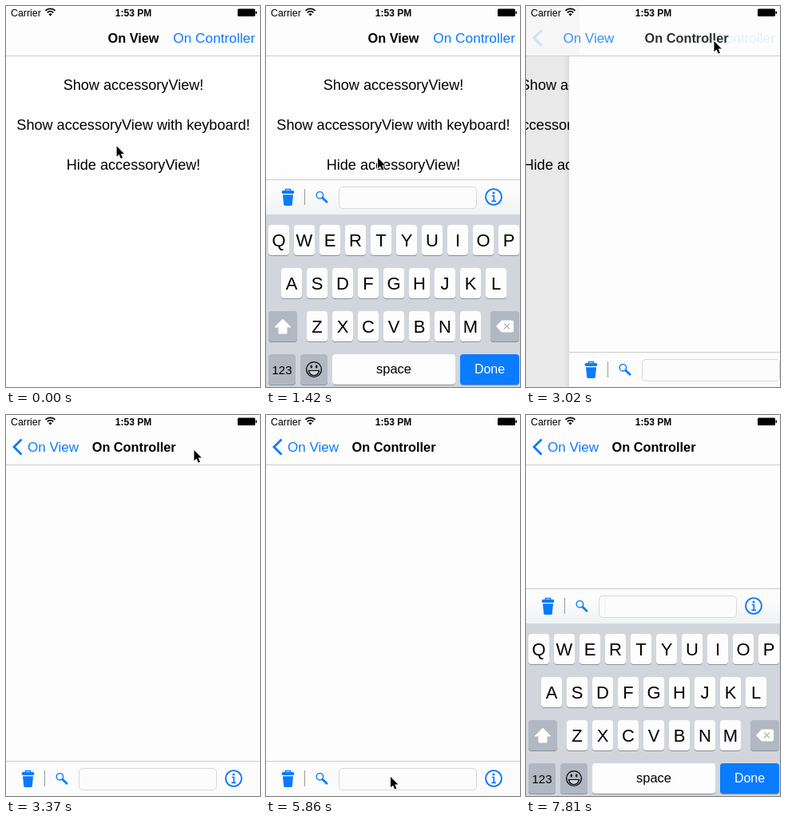
An HTML page that plays this animation: 318x477 px, repeating every 7.99 s.

```html
<!DOCTYPE html>
<html lang="en">
<head>
<meta charset="utf-8">
<title>Accessory view demo</title>
<style>
  html, body { margin: 0; width: 100%; height: 100%; overflow: hidden; background: #fefefe; }
  svg { display: block; width: 318px; height: 477px; }
  text { font-family: "Liberation Sans", Arial, sans-serif; font-size: 18.1px; fill: #000; }
  .mid { text-anchor: middle; }
  .bold { font-weight: bold; }
  .nav { font-size: 17px; }
  .blue { fill: #0a7aff; }
</style>
</head>
<body>
<svg id="stage" viewBox="0 0 318 477" xmlns="http://www.w3.org/2000/svg"></svg>
<script>
const LOOP = 7990, W = 318, H = 477, BAR = 44, KEYS = 216;
const BLUE = '#0a7aff';

const rect = (x, y, w, h, fill, more = '') =>
  `<rect x="${x}" y="${y}" width="${w}" height="${h}" fill="${fill}" ${more}/>`;
const path = (d, more) => `<path d="${d}" ${more}/>`;
const text = (x, y, s, more = '') => `<text x="${x}" y="${y}" ${more}>${s}</text>`;
const group = (id, body) => `<g id="${id}">${body}</g>`;

const key = (x, y, w, fill = '#fdfdfe') =>
  rect(x, y + 1, w, 38, '#8b9097', 'rx="4"') + rect(x, y, w, 38, fill, 'rx="4"');

function keyRow(letters, left, y) {
  return [...letters].map((c, i) => {
    const x = left + i * 32;
    return key(x, y, 26) + text(x + 13, y + 26.5, c, 'class="mid" style="font-size:22px"');
  }).join('');
}

function keyboard() {
  const grey = '#b1b8c2';
  const label = (x, y, s, size, fill = '#000') =>
    text(x, y, s, `class="mid" style="font-size:${size}px;fill:${fill}"`);
  return rect(0, 0, W, KEYS + 4, '#d2d6dc') +
    keyRow('QWERTYUIOP', 3, 13) + keyRow('ASDFGHJKL', 19, 67) + keyRow('ZXCVBNM', 51, 121) +
    key(3, 121, 36, grey) + key(281, 121, 36, grey) +
    path('M21 131L31 141H26V149H16V141H11Z', 'fill="#fff" stroke="#fff" stroke-linejoin="round"') +
    path('M288 140L295 132.5H307.5Q310 132.5 310 135V145Q310 147.5 307.5 147.5H295Z', 'fill="#fff"') +
    path('M298 136.5L305 143.5M305 136.5L298 143.5', `stroke="${grey}" stroke-width="1.4"`) +
    key(3, 175, 34, grey) + label(20, 200, '123', 15) +
    key(43, 175, 34, grey) +
    '<circle cx="60" cy="194" r="9.4" fill="none" stroke="#000" stroke-width="1.3"/>' +
    '<ellipse cx="56.8" cy="190.5" rx="1.2" ry="1.9"/><ellipse cx="63.2" cy="190.5" rx="1.2" ry="1.9"/>' +
    path('M53.5 195.5H66.5Q65 201.5 60 201.5Q55 201.5 53.5 195.5Z', 'fill="#d2d6dc" stroke="#000" stroke-width="1.2"') +
    key(83, 175, 154) + label(160, 199, 'space', 16.5) +
    key(243, 175, 74, '#0a7cff') + label(280, 199, 'Done', 16, '#fff');
}

function toolbar() {
  return rect(0, 0, W, BAR, '#fcfcfc') +
    rect(0, 0, W, BAR, 'url(#tint)', 'id="tint-bar"') +
    rect(0, 0, W, 1, '#cbcbcb') +
    path('M24.5 14V12.5H30.5V14', `fill="none" stroke="${BLUE}" stroke-width="1.6"`) +
    rect(19.8, 14, 15.4, 4, BLUE, 'rx="1.5"') +
    path('M21 19.3H34L32.8 31.5Q32.6 33 31 33H24Q22.4 33 22.2 31.5Z', `fill="${BLUE}"`) +
    rect(48, 12, 1, 20, '#999') +
    `<circle cx="67.4" cy="19.8" r="4.2" fill="none" stroke="${BLUE}" stroke-width="1.4"/>` +
    path('M70.8 23.2L76 28.2', `stroke="${BLUE}" stroke-width="2.8" stroke-linecap="round"`) +
    rect(91.5, 9.5, 172, 27, '#fcfcfc', 'rx="4.5" stroke="#d6d7d9"') +
    rect(98, 11, 2, 22, '#4a6bdc', 'id="caret"') +
    `<circle cx="285" cy="22" r="9.9" fill="none" stroke="${BLUE}" stroke-width="1.8"/>` +
    `<circle cx="285" cy="17" r="1.5" fill="${BLUE}"/>` +
    path('M282.8 20.5H285.3V27M282.3 27.3H288', `fill="none" stroke="${BLUE}" stroke-width="1.7"`);
}

function statusBar() {
  const arc = (r) => {
    const d = r * 0.72;
    return path(`M${55.5 - d} ${12 - d}A${r} ${r} 0 0 1 ${55.5 + d} ${12 - d}`,
      'fill="none" stroke="#000" stroke-width="1.8"');
  };
  return text(6, 13, 'Carrier', 'style="font-size:12.4px"') +
    arc(8.4) + arc(5.2) + path('M55.5 12.6L53.3 10.2Q55.5 8.4 57.7 10.2Z', '') +
    text(159.5, 13, '1:53 PM', 'class="mid bold" style="font-size:12px"') +
    rect(290, 3.5, 22, 9.5, '#000', 'rx="1.5"') + rect(312.5, 6.5, 1.6, 3.5, '#000', 'rx=".8"');
}

const stage = document.getElementById('stage');
stage.innerHTML = `<defs>
  <linearGradient id="tint" x2="0" y2="1">
    <stop offset=".3" stop-color="#fcfcfc"/><stop offset="1" stop-color="#f0f3f4"/>
  </linearGradient>
  <linearGradient id="edge"><stop stop-opacity="0"/><stop offset="1" stop-opacity=".06"/></linearGradient>
  </defs>` +
  rect(0, 0, W, H, '#fefefe') +
  group('first', text(159.5, 105, 'Show accessoryView!', 'class="mid"') +
    text(159.5, 155, 'Show accessoryView with keyboard!', 'class="mid"') +
    text(159.5, 205, 'Hide accessoryView!', 'class="mid"')) +
  rect(0, 62, W, 415, '#000', 'id="dim"') +
  group('second', rect(-7, 62, 7, 415, 'url(#edge)') + rect(0, 62, W, 415, '#fdfdfd')) +
  rect(0, 475, 138, 1, '#cbcbcb', 'id="stub"') +
  group('bar', toolbar()) + group('keys', keyboard()) +
  rect(0, 0, W, 62, '#fdfdfd') + rect(0, 0, W, 62, '#000', 'id="shade"') +
  rect(0, 62, W, 1, '#cbcbcb') + statusBar() +
  text(0, 46, 'On View', 'id="title1" class="mid bold" style="font-size:16.3px"') +
  text(312, 46, 'On Controller', 'id="button" class="blue" style="font-size:17.3px" text-anchor="end"') +
  text(0, 46, 'On View', 'id="back" class="nav blue"') +
  path('M19.5 30.5L10 40L19.5 49.5', `id="chevron" fill="none" stroke="${BLUE}" stroke-width="2.8"`) +
  text(0, 46, 'On Controller', 'id="title2" class="mid bold" style="font-size:16.3px"') +
  path('M0 0V13.2L3 10.4L5.2 15.6L7.4 14.7L5.2 9.6H9.3Z',
    'id="mouse" stroke="#fff" stroke-width="2" paint-order="stroke" stroke-linejoin="round"');

const el = {};
stage.querySelectorAll('[id]').forEach(n => el[n.id] = n);

const clamp = v => Math.max(0, Math.min(1, v));
const fade = (id, v) => el[id].setAttribute('opacity', clamp(v).toFixed(3));
const move = (id, x, y) => el[id].setAttribute('transform', `translate(${x.toFixed(2)} ${y.toFixed(2)})`);

// Critically damped spring: share of the way still to go
function left(t, start) {
  const x = Math.max(0, t - start) * 0.01826;
  return x > 12 ? 0 : (1 + x) * Math.exp(-x);
}

function blink(t, start) {
  const u = t - start + 40, v = u % 980;
  const rise = u < 980 ? 1 : clamp(v / 160);
  return Math.min(rise, clamp((710 - v) / 160));
}

// time, x, y of the pointer tip
const trail = [
  [0, 138.6, 175.5], [90, 138, 168], [180, 136.5, 157], [270, 136, 152.5],
  [980, 136, 152.5], [1330, 140, 190], [1960, 140, 190],
  [2310, 228, 69.5], [2490, 235.5, 46], [2670, 235.5, 44], [3920, 235.5, 44],
  [4080, 234.5, 46], [4270, 234.5, 46], [4350, 233, 50], [4435, 226, 76],
  [4520, 202, 162], [4610, 182, 249], [4700, 174, 321], [4790, 168, 372],
  [4960, 158, 428], [5140, 155.5, 441], [5590, 155.5, 441], [5860, 156, 453],
  [7100, 156, 453], [7190, 173, 466], [7270, 186, 480], [7990, 186, 520]
];

function pointer(t) {
  const i = trail.findIndex(p => p[0] > t);
  const [t0, x0, y0] = trail[i - 1], [t1, x1, y1] = trail[i];
  const k = (t - t0) / (t1 - t0);
  return [x0 + (x1 - x0) * k, y0 + (y1 - y0) * k];
}

const SHOW1 = 570, HIDE1 = 1926, PUSH = 2845, SHOW2 = 6171;

function draw(t) {
  const pushing = t >= PUSH;
  const go = left(t, PUSH), nav = left(t, PUSH + 10);
  const pageX = Math.round(W * go);

  move('first', -95 * (1 - go), 0);
  move('second', pageX, 0);
  fade('dim', 0.1 * (1 - go));
  fade('second', pushing ? 1 : 0);
  fade('shade', pushing ? 0.035 * (1 - go) : 0);
  el.shade.setAttribute('width', Math.min(W, pageX * 1.24));

  move('title1', 159.5 - 100 * (1 - nav), 0);
  fade('title1', nav ** 3);
  fade('button', nav ** 1.4);
  move('back', 27 + 100 * nav, 0);
  fade('back', 1 - nav);
  fade('chevron', (1 - nav) ** 8);
  move('title2', 160 + 211 * nav, 0);
  fade('title2', 1 - nav);

  let up, barY, keysY;
  if (pushing) {
    up = 1 - left(t, SHOW2);
    barY = Math.round(H - BAR - KEYS * up);
    keysY = Math.round(H - KEYS * up);
  } else {
    up = t < HIDE1 ? 1 - left(t, SHOW1) : left(t, HIDE1);
    barY = t > 2270 ? H + 1 : Math.round(H - (BAR + KEYS) * up);
    keysY = barY + BAR;
  }
  move('bar', pushing ? pageX : 0, barY);
  move('keys', 0, keysY);
  fade('tint-bar', up * 4);
  fade('stub', t > 2270 && t < 2580 ? 1 : 0);

  let caret = 0;
  if (t >= SHOW2) caret = blink(t, SHOW2);
  else if (t >= SHOW1 && t < HIDE1) caret = t < 800 ? 1 : blink(t, 751);
  fade('caret', caret);

  const [x, y] = pointer(t);
  move('mouse', x, y);
}

const begin = performance.now();
function tick() {
  draw((performance.now() - begin) % LOOP);
  requestAnimationFrame(tick);
}
tick();
</script>
</body>
</html>
```
